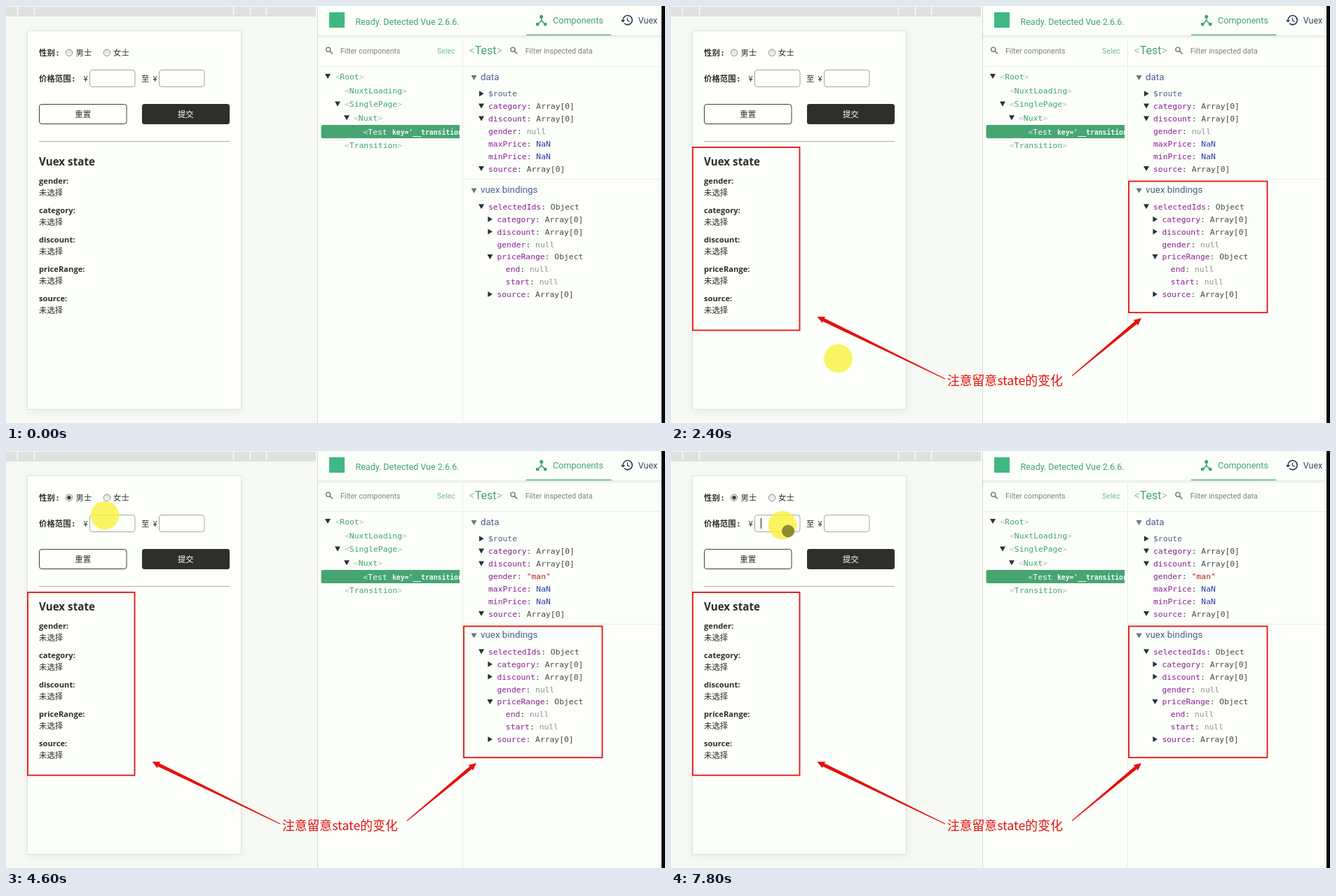
An HTML page that plays this animation: 940x596 px, repeating every 8000 ms.

```html
<!DOCTYPE html>
<html lang="zh-CN">
<head>
<meta charset="utf-8">
<title>Vuex state</title>
<style>
  html, body { margin: 0; width: 100%; height: 100%; overflow: hidden; background: #fcfefa; }
  svg { display: block; width: 100vw; height: 100vh; }
  text { white-space: pre; }
  .ui { font-family: Roboto, sans-serif; }
  .mono { font: 11.35px "DejaVu Sans Mono", monospace; }
  .cjk { font-family: "Noto Sans CJK SC", "Noto Sans CJK", sans-serif; font-size: 11.4px; }
  .bold { font-family: "Open Sans", sans-serif; font-weight: 700; }
</style>
</head>
<body>
<svg id="stage" viewBox="0 0 940 596" preserveAspectRatio="none">
  <defs>
    <filter id="soft" x="-10%" y="-10%" width="120%" height="120%"><feGaussianBlur stdDeviation="6"/></filter>
    <linearGradient id="fade" x2="0" y2="1">
      <stop stop-color="#e4ebe3"/><stop offset="1" stop-color="#fcfefa"/>
    </linearGradient>
    <linearGradient id="knob" x2="0" y2="1">
      <stop stop-color="#dcdedb"/><stop offset="1" stop-color="#f6f8f4"/>
    </linearGradient>
    <clipPath id="treeClip"><rect x="445" y="44" width="202" height="552"/></clipPath>
    <clipPath id="selectClip"><rect x="610" y="50" width="31" height="30"/></clipPath>
  </defs>
  <g id="page"></g>
  <g id="notes"></g>
  <line id="caret" x1="128.5" x2="128.5" y1="96" y2="111" stroke="#222"/>
  <g id="pointer">
    <circle r="20.3" fill="#faf23c" opacity=".8"/>
    <circle id="press" cx="8" cy="8.5" r="9" fill="#4c4a16" opacity=".62"/>
  </g>
</svg>
<script>
const NS = 'http://www.w3.org/2000/svg';
const $ = id => document.getElementById(id);
const page = $('page'), notes = $('notes');

function el(tag, attrs, parent = page, content) {
  const node = document.createElementNS(NS, tag);
  for (const k in attrs) node.setAttribute(k, attrs[k]);
  if (content !== undefined) node.textContent = content;
  parent.appendChild(node);
  return node;
}
const rect = (x, y, width, height, fill, more) => el('rect', { x, y, width, height, fill, ...more });
const line = (x1, y1, x2, y2, stroke, w = 1) => el('line', { x1, y1, x2, y2, stroke, 'stroke-width': w });
const text = (x, y, str, cls, fill, size, more) =>
  el('text', { x, y, class: cls, fill, style: size ? `font-size:${size}px` : '', ...more }, page, str);

// A text line made of [string, colour] parts
function rich(x, y, parts, parent = page) {
  const node = el('text', { x, y, class: 'mono' }, parent);
  return parts.map(([str, fill]) => el('tspan', { fill }, node, str));
}
const down = (x, y, fill = '#2b3038') => el('path', { d: `M${x - 4} ${y - 3.5}h8l-4 7z`, fill });
const right = (x, y) => el('path', { d: `M${x - 3} ${y - 4}l6.5 4l-6.5 4z`, fill: '#2b3038' });

const GREEN = '#42a372', INK = '#2b2e2b', GREY = '#8f938f', DARK = '#444845';
const KEY = '#862090', BLUE = '#2b3aa8', RED = '#e3120b', HEAD = '#47608a', RULE = '#e8ede6';

// Left backdrop, ruler and card
rect(0, 0, 940, 596, '#fcfefa');
rect(0, 0, 444, 596, '#f7f9f5');
rect(0, 1, 442, 14, '#dfe1de');
for (const x of [16.5, 40.5, 324.5, 348.5, 371.5]) line(x, 1, x, 13, '#fafcf8', 1.5);
rect(31, 37, 305, 542, '#dfe3e2', { filter: 'url(#soft)', opacity: 0.7 });
rect(30.5, 35.5, 305, 541, '#fdfffb', { stroke: '#dbe1ea' });

// Form
function radio(x) {
  el('circle', { cx: x, cy: 66.7, r: 4.8, fill: 'url(#knob)', stroke: '#8d908d' });
}
const field = x => rect(x, 91.5, 64.5, 24, '#fdfffb', { rx: 3.5, stroke: '#a3a6a3' });
const bold = { 'font-weight': 700 };
const mid = { 'text-anchor': 'middle' };
text(47, 71.3, '性别', 'cjk', INK, 0, bold);
text(71.7, 71.3, ':', 'cjk', INK, 0, bold);
radio(90);
text(99.5, 71.3, '男士', 'cjk', INK);
radio(144);
text(153, 71.3, '女士', 'cjk', INK);
text(47, 108, '价格范围', 'cjk', INK, 0, bold);
text(94.5, 108, ':', 'cjk', INK, 0, bold);
text(110.5, 108, '¥', 'cjk', INK);
field(119.5);
text(193, 108, '至', 'cjk', INK);
text(209.5, 108, '¥', 'cjk', INK);
field(218.5);
rect(47.5, 140.5, 124.5, 28, '#fdfffb', { rx: 3.5, stroke: '#3a3c3a' });
text(109.7, 159, '重置', 'cjk', INK, 0, mid);
rect(194, 140, 125, 29, '#2d2f2d', { rx: 3.5 });
text(256.3, 159, '提交', 'cjk', '#fdfffb', 0, mid);
line(47, 193.5, 319, 193.5, '#aeb1ad');
text(47, 228, 'Vuex state', 'bold', INK, 15.2);
['gender', 'category', 'discount', 'priceRange', 'source'].forEach((name, i) => {
  const y = 253.5 + i * 42.2;
  text(47, y, name + ':', 'bold', INK, 11.2);
  text(47, y + 17, '未选择', 'cjk', INK);
});
const dot = el('circle', { cx: 90, cy: 66.7, r: 2.7, fill: '#3b3d3b' });

// Inspector header
line(444.5, 0, 444.5, 596, '#d6d9d5');
rect(445, 42, 490, 5, 'url(#fade)');
rect(461, 9, 22, 22, '#41b883');
text(498.5, 27, 'Ready. Detected Vue 2.6.6.', 'ui', GREEN, 12.5);
el('path', {
  d: 'M17 16l-4-4V8.82C14.16 8.4 15 7.3 15 6c0-1.66-1.34-3-3-3S9 4.34 9 6c0 1.3.84 2.4 2 2.82V12l-4 4H3v5h5v-3.05l4-4.2 4 4.2V21h5v-5h-4z',
  fill: GREEN, transform: 'translate(753.5 10.3) scale(.85)'
});
text(780, 25.3, 'Components', 'ui', GREEN, 12.6);
rect(742, 40.6, 121.5, 1.5, '#5cae88');
el('path', {
  d: 'M13 3a9 9 0 0 0-9 9H1l4 4 4-4H6a7 7 0 1 1 2.06 4.94l-1.42 1.42A9 9 0 1 0 13 3zm-1 5v5l4.28 2.54.72-1.21-3.5-2.08V8z',
  fill: '#2f3a4a', transform: 'translate(876 10.3) scale(.82)'
});
text(901.8, 25.3, 'Vuex', 'ui', '#3c4856', 12.5);

// Filter bars
function glass(x, y) {
  el('circle', { cx: x, cy: y, r: 3.1, fill: 'none', stroke: '#6f736f', 'stroke-width': 1.3 });
  line(x + 2.3, y + 2.3, x + 6.3, y + 6.3, '#6f736f', 1.6);
}
glass(459.7, 62.2);
text(477, 67.5, 'Filter components', 'ui', '#7d817d', 10.6);
text(615, 68, 'Select', 'ui', '#73bd98', 10.6, { 'clip-path': 'url(#selectClip)' });
const title = el('text', { x: 660.5, y: 69, class: 'ui', style: 'font-size:16px' });
[['<', '#b5bab5'], ['Test', GREEN], ['>', '#b5bab5']].forEach(([s, fill]) => el('tspan', { fill }, title, s));
glass(723, 62.2);
text(740.7, 67.5, 'Filter inspected data', 'ui', '#7d817d', 10.6);
line(445, 86.5, 935, 86.5, RULE);
line(651.5, 46, 651.5, 596, RULE);
line(652, 247.5, 935, 247.5, RULE);

// Component tree
const tree = el('g', { 'clip-path': 'url(#treeClip)' });
el('rect', { x: 449.5, y: 170, width: 200, height: 19, rx: 2.5, fill: '#47a571' }, tree);
[['Root', 469.5], ['NuxtLoading', 483], ['SinglePage', 483], ['Nuxt', 496], null, ['Transition', 483]]
  .forEach((item, i) => {
    if (item) rich(item[1], 105 + i * 19.65, [['<', '#b9beb9'], [item[0], GREEN], ['>', '#b9beb9']], tree);
  });
rich(509.5, 183.8, [['<', '#d5ecdf'], ['Test', '#fff']], tree);
el('text', { x: 551, y: 183.8, class: 'mono', fill: '#f1faf4', style: 'font-size:9.75px;font-weight:700' },
  tree, "key='__transition-test'");
down(459, 100.5);
down(473, 140);
down(486, 159.7);

// Inspected data
function section(y, label) {
  down(667.5, y + 1.5, '#6d747c');
  text(677, y + 4.5, label, 'ui', HEAD, 13.35);
}
// Row: [indent, key, value, colour, arrow]
function rows(top, list) {
  return list.map(([indent, key, value, fill, arrow], i) => {
    const x = 688 + indent * 12.4, y = top + i * 17.9;
    if (arrow) arrow(x - 10, y);
    return rich(x, y + 4, [[key, key[0] === '$' ? HEAD : KEY], [value ? ': ' : '', DARK], [value, fill]]);
  });
}
const ARR = 'Array[0]', OBJ = 'Object';
section(101, 'data');
const data = rows(125.2, [
  [0, '$route', '', DARK, right],
  [0, 'category', ARR, DARK, down],
  [0, 'discount', ARR, DARK, down],
  [0, 'gender', 'null', GREY],
  [0, 'maxPrice', 'NaN', BLUE],
  [0, 'minPrice', 'NaN', BLUE],
  [0, 'source', ARR, DARK, down]
]);
const gender = data[3][2];
section(262.5, 'vuex bindings');
rows(286.8, [
  [0, 'selectedIds', OBJ, DARK, down],
  [1, 'category', ARR, DARK, right],
  [1, 'discount', ARR, DARK, right],
  [1, 'gender', 'null', GREY],
  [1, 'priceRange', OBJ, DARK, down],
  [2, 'end', 'null', GREY],
  [2, 'start', 'null', GREY],
  [1, 'source', ARR, DARK, right]
]);
rect(935, 0, 5, 596, '#050505');

// Red notes
function frame(x, y, width, height) {
  el('rect', { x, y, width, height, fill: 'none', stroke: RED, 'stroke-width': 1.8 }, notes);
}
function arrow(x, y, tx, ty) {
  const len = Math.hypot(tx - x, ty - y), turn = Math.atan2(ty - y, tx - x) * 180 / Math.PI;
  el('path', {
    d: `M0 0L11 -5.2L10 -2.5L${len} -.5V.5L10 2.5L11 5.2z`,
    fill: RED, transform: `translate(${x} ${y}) rotate(${turn})`
  }, notes);
}
frame(31, 202, 152.5, 261.5);
frame(653, 250.5, 197.5, 187.7);
arrow(208.5, 444, 391, 533);
arrow(671, 446, 572, 528.5);
el('text', { x: 394, y: 542.3, class: 'cjk', fill: RED, style: 'font-size:17.8px;font-weight:500' }, notes,
  '注意留意state的变化');

// Pointer path: [time, x, y]
const PATH = [
  [2000, 250, 618], [3200, 206, 177], [3800, 88, 48], [4400, 98, 72],
  [4600, 141, 92], [5000, 176, 172], [5400, 175, 128], [5600, 175, 128], [5800, 159, 106]
];
function pointerAt(t) {
  let i = 0;
  while (i < PATH.length - 2 && t >= PATH[i + 1][0]) i++;
  const [t0, x0, y0] = PATH[i], [t1, x1, y1] = PATH[i + 1];
  const k = Math.max(0, Math.min(1, (t - t0) / (t1 - t0))), e = k * k * (3 - 2 * k);
  return [x0 + (x1 - x0) * e, y0 + (y1 - y0) * e];
}
const show = (node, on) => node.setAttribute('visibility', on ? 'visible' : 'hidden');

const LOOP = 8000, STEP = 200;
function draw(now) {
  const t = Math.floor((now % LOOP) / STEP) * STEP;
  const chosen = t >= 4600;
  show(notes, t >= 1400);
  show(dot, chosen);
  gender.textContent = chosen ? '"man"' : 'null';
  gender.setAttribute('fill', chosen ? '#b3221c' : GREY);
  show($('caret'), t >= 7600);
  $('pointer').setAttribute('transform', `translate(${pointerAt(t)})`);
  show($('pointer'), t >= 2200);
  $('press').style.display = t >= 5800 || t === 4400 ? '' : 'none';
}
const start = performance.now();
function tick() {
  draw(performance.now() - start);
  requestAnimationFrame(tick);
}
tick();
</script>
</body>
</html>
```
